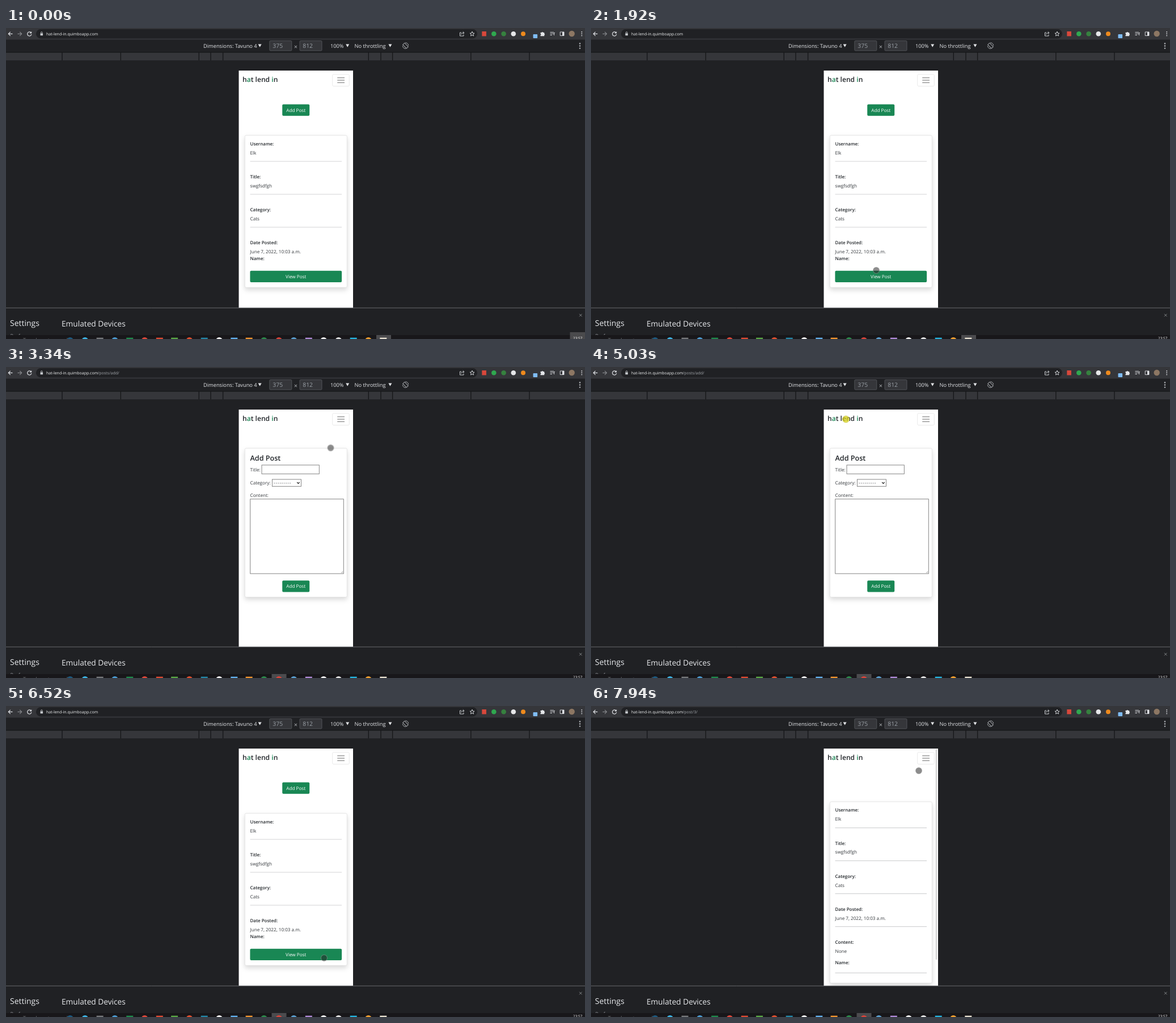
These frames come from a looping animation (1021 by 548 pixels, 8000 ms). An HTML page:

```html
<!DOCTYPE html>
<html lang="en">
<head>
<meta charset="utf-8">
<title>Mobile page preview</title>
<style>
html, body { margin: 0; width: 100%; height: 100%; overflow: hidden; background: #202124; }
svg { display: block; font: 8.15px "Open Sans", "Noto Sans", sans-serif; text-rendering: geometricPrecision; }
.label { font-weight: 600; font-size: 7.95px; fill: #212529; }
.value { fill: #34383c; }
.rule { stroke: #d3d4d5; stroke-width: 1.1; }
.card { fill: #fff; stroke: #dcdcdc; stroke-width: .7; filter: drop-shadow(0 4.3px 4.3px rgba(0, 0, 0, .15)); }
.btn { fill: #198754; }
.btn-text { fill: #fff; text-anchor: middle; }
.field { fill: #fff; stroke: #777; stroke-width: .9; }
.tool { fill: #e3e5e8; font-size: 9.25px; }
.size { fill: #35363a; stroke: #5a5c60; stroke-width: .8; }
.size-text { fill: #9aa0a6; font-size: 10.4px; }
.line { fill: none; stroke: #dfe1e5; stroke-width: 1.2; }

/* one shared 8 s timeline; 1% = 80 ms */
.show { opacity: 0; animation: 8s step-end infinite; }
.home { animation-name: home; }
.add { animation-name: add; }
.detail { animation-name: detail; }
.add-url { animation-name: add-url; }
.detail-url { animation-name: detail-url; }
.idle { animation-name: idle; }
.loading { animation-name: loading; }
.task-a { animation-name: task-a; }
.task-b { animation-name: task-b; }
.clock { animation-name: clock; }
.press { animation-name: press; }
.rest { animation-name: rest; }
@keyframes home { 0%, 66.2% { opacity: 1 } 36.7%, 93.2% { opacity: 0 } }
@keyframes add { 0%, 64.6% { opacity: 0 } 38.6% { opacity: 1 } }
@keyframes detail { 0% { opacity: 0 } 95%, 100% { opacity: 1 } }
@keyframes add-url { 0%, 64.6% { opacity: 0 } 36.7% { opacity: 1 } }
@keyframes detail-url { 0% { opacity: 0 } 93.2%, 100% { opacity: 1 } }
@keyframes loading { 0%, 38.6%, 66.2%, 95% { opacity: 0 } 35%, 63.7%, 91.5% { opacity: 1 } }
@keyframes idle { 0%, 38.6%, 66.2%, 95%, 100% { opacity: 1 } 35%, 63.7%, 91.5% { opacity: 0 } }
@keyframes task-a { 0% { opacity: 1 } 35%, 100% { opacity: 0 } }
@keyframes task-b { 0% { opacity: 0 } 35%, 100% { opacity: 1 } }
@keyframes clock { 0% { opacity: 1 } 1.7%, 100% { opacity: 0 } }
@keyframes press { 0%, 35.7%, 64.6%, 91.5% { opacity: 0 } 33.3%, 62.8%, 89.7% { opacity: 1 } }
@keyframes rest { 0%, 35.7%, 64.6%, 91.5%, 100% { opacity: 1 } 33.3%, 62.8%, 89.7% { opacity: 0 } }

.pointer { animation: move 8s linear infinite; }
@keyframes move {
  0%, .8% { transform: translate(1030px, 557px); animation-timing-function: ease-in-out }
  9.7% { transform: translate(504px, 149.5px); animation-timing-function: ease-out }
  11.5%, 17.3% { transform: translate(510.5px, 148.5px); animation-timing-function: ease-in }
  20.6% { transform: translate(517px, 290px); animation-timing-function: ease-out }
  24%, 25% { transform: translate(503px, 427px); animation-timing-function: ease-in }
  28% { transform: translate(515px, 310px); animation-timing-function: ease-out }
  32.3%, 36% { transform: translate(504.5px, 147px); animation-timing-function: ease-in-out }
  41.7%, 43.5% { transform: translate(572.5px, 142.5px); animation-timing-function: ease-in-out }
  48.6%, 49.4% { transform: translate(454px, 104px); animation-timing-function: ease-out }
  55.4%, 70.4% { transform: translate(449.5px, 92px); animation-timing-function: ease-in }
  73.4% { transform: translate(550px, 84px) }
  75.4% { transform: translate(603px, 165px) }
  79% { transform: translate(585px, 380px); animation-timing-function: ease-out }
  81.5% { transform: translate(561px, 444px); animation-timing-function: ease-out }
  84.9%, 91.5% { transform: translate(547px, 441.5px); animation-timing-function: ease-in-out }
  99.2%, 100% { transform: translate(578px, 114px) }
}
</style>
</head>
<body>
<svg width="1021" height="548" viewBox="0 0 1021 548">
  <defs>
    <clipPath id="screen"><path d="M410.5 75H612V493H410.5Z"/></clipPath>
    <path id="down" d="M-3 -2.6H3L0 2.8Z" fill="#e3e5e8"/>
    <g id="fields">
      <g class="label">
        <text x="430.5" y="206.7">Username:</text>
        <text x="430.5" y="265">Title:</text>
        <text x="430.5" y="323.2">Category:</text>
        <text x="430.5" y="381.2">Date Posted:</text>
      </g>
      <g class="value">
        <text x="430.5" y="222.8">Elk</text>
        <text x="430.5" y="280.8">swgfsdfgh</text>
        <text x="430.5" y="339">Cats</text>
        <text x="430.5" y="397">June 7, 2022, 10:03 a.m.</text>
      </g>
      <path class="rule" d="M430.5 235H592M430.5 293H592M430.5 351H592"/>
    </g>
  </defs>

  <rect width="1021" height="548" fill="#202124"/>

  <!-- browser bar -->
  <rect width="1021" height="20.5" fill="#35363a"/>
  <rect x="53" y="2" width="778" height="16.5" rx="8.2" fill="#202124"/>
  <path class="line" d="M11.5 10.3H4.5M7.8 6.8 4.3 10.3 7.8 13.8"/>
  <path class="line" style="stroke:#85878b" d="M20.5 10.3H27.5M24.2 6.8 27.7 10.3 24.2 13.8"/>
  <g class="show idle">
    <path class="line" d="M44 8A3.6 3.6 0 1 0 44.9 11"/>
    <path d="M45.2 6V9.6H41.6Z" fill="#dfe1e5"/>
  </g>
  <path class="show loading line" d="M38.3 7.3 44.3 13.3M44.3 7.3 38.3 13.3"/>
  <rect x="60.5" y="9.2" width="4.6" height="4" rx=".5" fill="#c4c7cb"/>
  <path class="line" style="stroke:#c4c7cb;stroke-width:.8" d="M61.5 9.2V8A1.3 1.3 0 0 1 64.1 8V9.2"/>
  <g font-size="7">
    <text x="71" y="12.8" fill="#f1f3f4">hat-lend-in.quimboapp.com<tspan class="suffix"></tspan></text>
    <text class="show add-url" x="161.7" y="12.8" fill="#a4a8ad">/posts/add/</text>
    <text class="show detail-url" x="161.7" y="12.8" fill="#a4a8ad">/post/3/</text>
  </g>
  <g class="line" style="stroke-width:.9">
    <path d="M803 8H800.5V14H807V11.8M802.5 11.5C803 9 805 8.5 808 8.5M805.7 6.3 808 8.5 805.7 10.8"/>
    <path d="M822 6.2 823.1 9 826 9.2 823.8 11.1 824.5 14 822 12.4 819.5 14 820.2 11.1 818 9.2 820.9 9Z"/>
    <path d="M959.5 7.5H966M959.5 10H966M959.5 12.5H963M966.5 13V8.5H968"/>
    <path d="M977.2 7H984V13.5H977.2Z"/>
  </g>
  <path d="M981 7H984V13.5H981Z" fill="#dfe1e5"/>
  <rect x="839.3" y="6" width="7.6" height="8.4" fill="#d8483b"/>
  <circle cx="860.3" cy="10.2" r="4.3" fill="#2fa84f"/>
  <circle cx="877.6" cy="10.2" r="4.3" fill="#36813f"/>
  <circle cx="894.8" cy="10.2" r="4.3" fill="#e6e7e9"/>
  <circle cx="912" cy="10.2" r="4" fill="#ee8a1d"/>
  <rect x="929.5" y="11" width="7.6" height="7" rx="1" fill="#7fbcf5"/>
  <path d="M942.5 8H944.5A1.4 1.4 0 0 1 947.2 8H949.2V10A1.4 1.4 0 0 1 949.2 12.6V14.3H942.5V12.4A1.3 1.3 0 0 0 942.5 9.9Z" fill="#e3e5e8"/>
  <circle cx="997.7" cy="10" r="5.2" fill="#8d7763"/>
  <g fill="#dfe1e5"><circle cx="1015.3" cy="7" r=".9"/><circle cx="1015.3" cy="10.2" r=".9"/><circle cx="1015.3" cy="13.4" r=".9"/></g>

  <!-- device toolbar and ruler -->
  <g class="tool">
    <text x="348" y="34.7">Dimensions: Tavuno 4</text>
    <text x="572" y="34.7">100%</text>
    <text x="614.5" y="34.7">No throttling</text>
    <text x="507.8" y="36.5" font-size="11" fill="#aeb1b5">×</text>
  </g>
  <rect class="size" x="464.8" y="22.5" width="39" height="17.5" rx="1.5"/>
  <rect class="size" x="518" y="22.5" width="39" height="17.5" rx="1.5"/>
  <g class="size-text"><text x="470.3" y="35.2">375</text><text x="523.2" y="35.2">812</text></g>
  <use href="#down" x="447.6" y="31"/><use href="#down" x="602.2" y="31"/><use href="#down" x="677.4" y="31"/>
  <g class="line" style="stroke:#a5a8ac;stroke-width:1">
    <rect x="-2.2" y="-4.6" width="4.4" height="9.2" transform="translate(704.5 31.2) rotate(-45)"/>
    <path d="M704 26A5.2 5.2 0 0 1 709.7 31M705 36.4A5.2 5.2 0 0 1 699.3 31.4"/>
  </g>
  <g fill="#a5a8ac"><circle cx="1012" cy="27.4" r="1.3"/><circle cx="1012" cy="31.6" r="1.3"/><circle cx="1012" cy="35.8" r="1.3"/></g>
  <rect y="43" width="1021" height="14" fill="#35363a"/>
  <path d="M0 42.7H1021M99 43V57M202.3 43V57M340.3 43V57M361 43V57M382.6 43V57M639.3 43V57M661 43V57M681.6 43V57M819.8 43V57M923 43V57" stroke="#17181a" stroke-width="1.4"/>

  <!-- phone screen -->
  <g clip-path="url(#screen)">
    <path d="M410 75H612V493H410Z" fill="#fff"/>
    <text x="417" y="95" font-size="12.1" font-weight="600" fill="#212529">h<tspan fill="#198754">a</tspan>t lend <tspan fill="#198754">i</tspan>n</text>
    <rect x="575.7" y="81.7" width="29.6" height="20.8" rx="2" fill="#fff" stroke="#e4e4e4" stroke-width=".8"/>
    <path d="M584.2 87.7H597M584.2 92H597M584.2 96.3H597" stroke="#6b6b6b" stroke-width="1.1"/>

    <g class="show home">
      <rect class="btn" x="487.2" y="134.5" width="48" height="20.2" rx="2"/>
      <text class="btn-text" x="511.2" y="147.7">Add Post</text>
      <rect class="card" x="421.3" y="189.2" width="180" height="268" rx="2.2"/>
      <use href="#fields"/>
      <text class="label" x="430.5" y="408.9">Name:</text>
      <rect class="btn" x="430.4" y="427.8" width="161.7" height="20.2" rx="2"/>
      <text class="btn-text" x="511.2" y="441">View Post</text>
    </g>

    <g class="show add">
      <rect class="card" x="421.3" y="143.2" width="180" height="262.3" rx="2.2"/>
      <text x="430.5" y="165" font-size="12.6" font-weight="600" fill="#212529">Add Post</text>
      <g class="value">
        <text x="430.5" y="183.8">Title:</text>
        <text x="430.5" y="207.2">Category:</text>
        <text x="430.5" y="229">Content:</text>
        <text x="472" y="207" letter-spacing=".85">---------</text>
      </g>
      <rect class="field" x="451" y="172.8" width="101.3" height="15.5"/>
      <rect class="field" x="469.4" y="198" width="51" height="12.3" style="fill:none"/>
      <path d="M513.2 203 515.4 205.3 517.6 203" fill="none" stroke="#222" stroke-width="1.2"/>
      <rect class="field" x="430.7" y="232.7" width="164.6" height="131.4"/>
      <path d="M591 363 594.3 359.7M593 363 594.3 361.7" stroke="#777" stroke-width=".6"/>
      <rect class="btn" x="487.2" y="376.2" width="48" height="20.2" rx="2"/>
      <text class="btn-text" x="511.2" y="389.4">Add Post</text>
    </g>

    <g class="show detail">
      <rect class="card" x="421.3" y="168.8" width="180" height="319.4" rx="2.2"/>
      <use href="#fields" y="-20.4"/>
      <g class="label"><text x="430.5" y="418.9">Content:</text><text x="430.5" y="455">Name:</text></g>
      <text class="value" x="430.5" y="434.8">None</text>
      <path class="rule" d="M430.5 388.6H592M430.5 470.4H592"/>
      <rect x="607.8" y="76" width="2.2" height="371" rx="1" fill="#cfcfcf"/>
    </g>
  </g>

  <!-- settings drawer -->
  <path d="M0 493.2H1021" stroke="#696b6e"/>
  <g fill="#e8eaed">
    <text x="7" y="525" font-size="14">Settings</text>
    <text x="98" y="525.6" font-size="13.7">Emulated Devices</text>
  </g>
  <path d="M1011 503.8 1015.6 508.4M1015.6 503.8 1011 508.4" stroke="#8e9195" stroke-width=".9"/>
  <text x="7.5" y="545.5" font-size="9.2" fill="#9a9da1">Pref</text>

  <!-- taskbar -->
  <rect y="541" width="1021" height="7" fill="#18171a"/>
  <text x="30" y="553" font-size="9" fill="#77797c">Type here to search</text>
  <rect class="show task-a" x="653" y="541" width="26" height="7" fill="#4b4b4e"/>
  <rect class="show task-b" x="468.5" y="541" width="26" height="7" fill="#4b4b4e"/>
  <g id="tasks"></g>
  <rect class="show clock" x="994.5" y="536" width="26.5" height="12" fill="#4a4a4c"/>
  <text x="1000" y="548.8" font-size="6.4" fill="#fff">23:57</text>

  <g class="pointer">
    <circle class="show rest" r="5.5" fill="#222" fill-opacity=".52" stroke="#999" stroke-opacity=".55" stroke-width="1.1"/>
    <circle class="show press" r="6" fill="#d9d414" fill-opacity=".72" stroke="#b5b02a" stroke-opacity=".5"/>
  </g>
</svg>
<script>
// Taskbar icons: "o" is a disc, "s" a square, followed by its colour.
const icons = "o1d5a80 o3db5e6 s77797c o4b9cd3 s1f8a4c oe0483a sdf4a32 s5aa845 oe2502f s2487a8 of2f2f2 s62b0ee sf2952e o2c8a4b od8443a o5a9fd0 sb08ad8 of0f0f0 oe4e4e4 s25b4e0 of0a030 se6dfcf";
document.getElementById("tasks").innerHTML = icons.split(" ").map((icon, i) => {
  const x = 113 + 26.3 * i, fill = `fill="#${icon.slice(1)}"`;
  return icon[0] === "o"
    ? `<circle cx="${x}" cy="551" r="6" ${fill}/>`
    : `<rect x="${x - 6}" y="545.7" width="12" height="12" ${fill}/>`;
}).join("");
</script>
</body>
</html>
```
